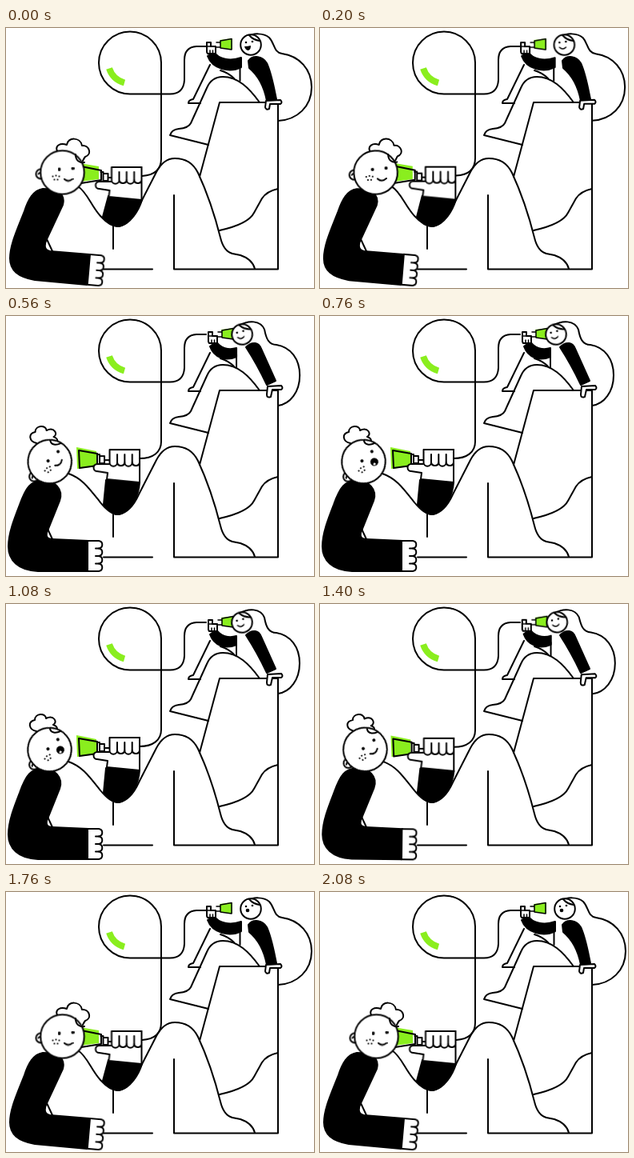
These frames come from a looping animation (385 px wide and 325 px high, 2120 ms). An HTML page without scripts:

```html
<!DOCTYPE html>
<html lang="en">
<head>
<meta charset="utf-8">
<title>Can phone chat</title>
<style>
  html, body { margin: 0; width: 100%; height: 100%; overflow: hidden; background: #fff; }
  svg { display: block; width: 385px; height: 325px; }
  .line { fill: none; stroke: #000; stroke-width: 2; stroke-linecap: round; stroke-linejoin: round; }
  .white { fill: #fff; }
  .ink { fill: #000; }
  .dot { fill: #000; stroke: none; }
  .lime { fill: #8aee1e; stroke: none; }
  .shine { stroke: #8aee1e; stroke-width: 8; stroke-linecap: butt; }
  .thin { stroke-width: 1.5; }

  /* --a is the listening pose, --b the talking pose */
  .morph { d: var(--a); animation: morph 2120ms infinite; }
  .move { transform: var(--a); animation: move 2120ms infinite; }
  @keyframes morph {
    0%, 5.7%, 81%, 100% { d: var(--a); animation-timing-function: ease-in-out; }
    28.3%, 61.3% { d: var(--b); animation-timing-function: ease-in-out; }
  }
  @keyframes move {
    0%, 5.7%, 81%, 100% { transform: var(--a); animation-timing-function: ease-in-out; }
    28.3%, 61.3% { transform: var(--b); animation-timing-function: ease-in-out; }
  }
  .palm { transform-origin: 102px 281px; }

  .mouth { opacity: 0; animation: 2120ms step-end infinite; }
  .talk-low { animation-name: talk-low; }
  .calm-low { animation-name: calm-low; }
  .talk-top { animation-name: talk-top; }
  .calm-top { animation-name: calm-top; }
  .grin-top { animation-name: grin-top; }
  @keyframes talk-low { 0% { opacity: 0; } 27% { opacity: 1; } 60% { opacity: 0; } }
  @keyframes calm-low { 0% { opacity: 1; } 27% { opacity: 0; } 60% { opacity: 1; } }
  @keyframes talk-top { 0% { opacity: 0; } 79% { opacity: 1; } }
  @keyframes calm-top { 0% { opacity: 0; } 9% { opacity: 1; } 79% { opacity: 0; } }
  @keyframes grin-top { 0% { opacity: 1; } 9% { opacity: 0; } }
</style>
</head>
<body>
<svg viewBox="0 0 385 325">
  <g class="line">
    <!-- cord with its bubble -->
    <path d="M250 23H238Q223 24 223 40V65Q222 82.500 205 82.500H155A39 39 0 1 1 194 43.500V90"/>
    <path class="morph" style="--a:path('M194 88V163C194 177 186 184 170 185');--b:path('M194 88V157C194 170 184 178 167 178')"/>
    <path class="shine" d="M129 50.500A28 28 0 0 0 148 68.500"/>

    <!-- cliff -->
    <path class="morph" style="--a:path('M303 11C308 6 322 6 329 12C336 19 334 30 345 32C367 35 382 52 382 74C382 98 364 115 340 116');--b:path('M291 12C303 5 318 5 323 17C325 28 328 36 338 36C356 39 367 54 367 74C367 95 355 110 340 112')"/>
    <path d="M242 186L267 93H340V301.500H210V209"/>
    <path d="M340 201Q326 204 320 213L310 231Q303 245 267 253"/>

    <!-- upper figure: legs -->
    <path d="M255 46L234 89Q228 90 228 94H243M268 53Q278 56 285 63"/>
    <path d="M253 146L205 134Q207 127 216 126Q228 125 231 119L251 75Q257 61 271 61C290 61 304 75 317 93"/>

    <!-- upper figure: arms -->
    <path class="morph" style="--a:path('M292.500 48V66');--b:path('M288 48V65')"/>
    <path class="ink morph" style="--a:path('M252 35L260 30C266 39 280 42 294 37V49C280 56 258 52 252 35Z');--b:path('M255 38L263 32C268 40 278 43 288 40V51C274 57 260 52 255 38Z')"/>
    <path class="ink morph" style="--a:path('M303 41C309 33 321 35 326 44C332 57 335 75 338 89L326 91C323 75 316 60 304 50Z');--b:path('M300 39C308 31 316 33 319 41L337 81L326 86C318 69 311 56 300 39Z')"/>
    <path class="white morph" style="--a:path('M325 91L343 90Q346 93 343 95L330 95L329 101Q325 103 324 99Z');--b:path('M327 88L344 87Q347 90 344 92L333 92L331 101Q326 103 326 98Z')"/>

    <!-- upper figure: can and fist -->
    <g class="move" style="--a:translate(0px,0px);--b:translate(2px,2px)">
      <path class="lime" d="M267 15L283 13V27L268 25Z"/>
      <path class="thin" d="M263 18H268V24H263M268 16L282 13.500V27L268 25Z"/>
      <path class="white" d="M251 30V18H256V23H262V32H252Z"/>
      <path class="thin" d="M255 28V32M258.500 28V32M251 23H256"/>
    </g>

    <!-- upper figure: head -->
    <g class="move" style="--a:translate(306px,21px);--b:translate(295px,23px) rotate(-8deg)">
      <circle class="white" r="12.800"/>
      <path d="M-2 -12Q3 -6 11 -5"/>
      <g class="dot"><circle cx="-6" cy="-3" r="1.300"/><circle cx="2" cy="-4" r="1.300"/></g>
      <path class="mouth calm-top thin" d="M-6 3Q-2 7 2 3"/>
      <circle class="mouth talk-top dot" cx="-4" cy="2" r="2.300"/>
      <path class="mouth grin-top dot" d="M-8 2Q-4 2 0 1Q0 7 -4 7Q-7 6 -8 2Z"/>
    </g>

    <!-- lower figure: legs and ground -->
    <path d="M141 248Q156 245 166 223L188 180Q197 163 211 163Q231 163 240 181C252 207 262 238 268 262Q272 279 283 282L293 284Q308 289 311 301"/>
    <path d="M134 247V276M122 301.500H183M51 264L58 279"/>

    <!-- lower figure: arm on the ground -->
    <path class="ink morph" style="--a:path('M23 229C28 214 34 203 46 201C62 201 75 206 71 221L50 266Q46 277 55 279L104 283L101 321L36 315C15 311 5 303 5 288C5 271 14 252 23 229Z');--b:path('M17 236C25 214 31 206 45 206C61 205 72 217 67 231L51 271Q49 279 58 279L103 281L102 319L40 319C15 318 3 305 3 288C3 272 10 254 17 236Z')"/>
    <g class="move palm" style="--a:translate(3px,2px) rotate(5deg);--b:translate(0px,0px) rotate(0deg)">
      <path class="white" d="M102 281H116A5 4.800 0 0 1 116 290.500A5 4.800 0 0 1 116 300A5 4.800 0 0 1 116 309.500A5 4.800 0 0 1 116 319H102Z"/>
      <path d="M112 290.500H116M112 300H116M112 309.500H116"/>
    </g>

    <!-- lower figure: raised arm -->
    <path class="morph" style="--a:path('M90 198C102 206 106 222 118 235Q131 249 141 248');--b:path('M78 197C95 203 103 214 118 233Q131 249 141 248')"/>
    <path class="ink morph" style="--a:path('M128 210L170 215C166 228 156 245 141 248C134 248 126 242 121 236Z');--b:path('M125 205L167 208C166 223 158 243 141 248C134 248 128 243 122 236Z')"/>

    <!-- lower figure: can and fist -->
    <path class="lime morph" style="--a:path('M92 169L116 173V189L93 192Z');--b:path('M88 164L113 169V188L89 191Z')"/>
    <path class="morph" style="--a:path('M94 173L119 178V190L94 194Z');--b:path('M91 168L114 172V187L92 190Z')"/>
    <path class="move" style="--a:translate(4.500px,7px);--b:translate(0px,0px)" d="M114 173H117V186H114M117 175H123V184H117M123 180H130"/>
    <g class="move" style="--a:translate(2.500px,7px);--b:translate(0px,0px)">
      <path class="white" d="M130 185H114A4.500 4.500 0 0 0 114 194L127 196L126 204L167 208V167H130Z"/>
      <path class="white" d="M129.500 167V183A4.700 4.700 0 0 0 139 183A4.700 4.700 0 0 0 148.300 183A4.700 4.700 0 0 0 157.700 183A4.700 4.700 0 0 0 167 183V167Z"/>
      <path d="M139 173V183M148.300 173V183M157.700 173V183"/>
    </g>

    <!-- lower figure: head -->
    <path class="white morph" style="--a:path('M64 154C61 147 68 143 76 146C77 136 93 136 95 147C104 146 108 158 99 161C98 162 97 164 96 166');--b:path('M38 159C28 157 27 147 36 145C36 136 50 136 50 143C60 138 65 148 59 151C66 153 64 158 62 161')"/>
    <g class="move" style="--a:translate(70.500px,180.500px) rotate(0deg);--b:translate(54.500px,182px) rotate(-40deg)">
      <circle class="white" cx="-27" cy="2" r="6"/>
      <path d="M-30 2Q-28 -1 -26 2"/>
      <circle class="white" r="27.300"/>
      <g class="dot">
        <g class="move" style="--a:translate(0px,0px);--b:translate(3px,2px)"><circle cx="-4" cy="-4" r="2"/><circle cx="13" cy="-5" r="2"/></g>
        <circle cx="-12" cy="5" r="1.100"/><circle cx="-8" cy="4" r="1.100"/><circle cx="-4" cy="5" r="1.100"/>
        <circle cx="-10" cy="9" r="1.100"/><circle cx="-6" cy="9" r="1.100"/>
      </g>
      <path class="mouth calm-low" d="M2 8Q7 13 13 8"/>
      <g class="mouth talk-low"><circle class="dot" cx="10" cy="9" r="5"/><circle cx="8.500" cy="11" r="1.600" fill="#fff" stroke="none"/></g>
    </g>
    <path class="morph" style="--a:path('M87 158C87 165 91 169 98 168');--b:path('M55 156C56 161 62 162 68 159')"/>
  </g>
</svg>
</body>
</html>
```
